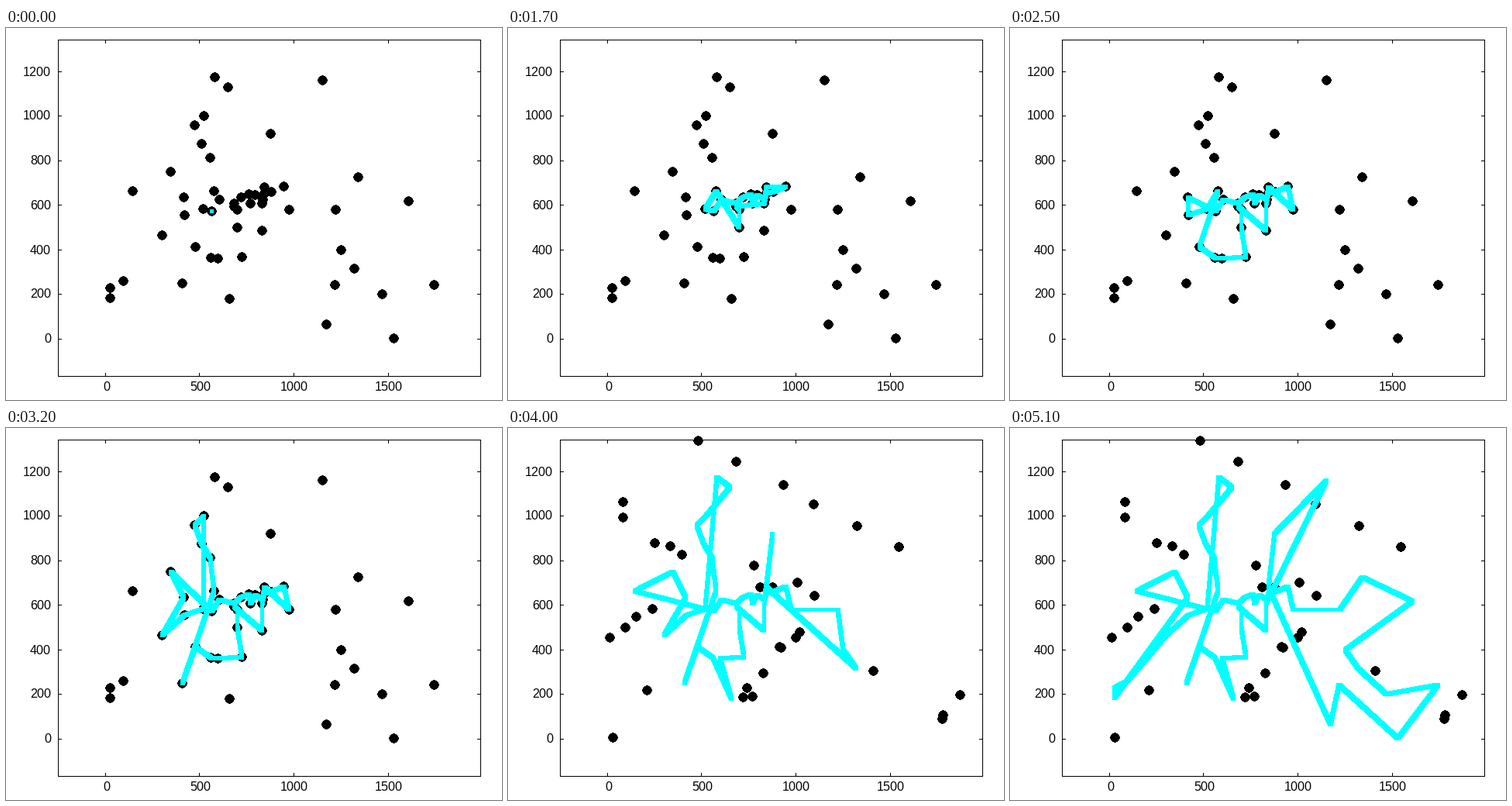
These frames come from a looping animation (640x480 px, 5.2 s). A matplotlib script:

```python
import numpy as np
import matplotlib.pyplot as plt
from matplotlib.animation import FuncAnimation
from matplotlib.collections import PolyCollection
from matplotlib.patches import Rectangle

W, H, DPI = 640, 480, 100
LEFT, RIGHT, TOP, BOTTOM = 67, 612, 15, 449
PEN, RADIUS, DIGIT = 5, 5.6, 9
SWAP_STEP = 39  # the dots switch to the second set here

# Corner points of the route, by region; the tour starts in the centre
CENTRE = [(565, 575), (520, 585), (575, 665), (605, 625), (685, 610),
          (685, 595), (700, 580), (720, 635), (760, 650), (795, 645),
          (770, 610), (830, 610), (835, 625), (845, 655), (845, 680),
          (880, 660), (945, 685), (975, 580)]
WEST = [(420, 555), (415, 635), (345, 750), (145, 665), (300, 465),
        (95, 260), (25, 230), (25, 185)]
NORTH = [(555, 815), (510, 875), (475, 960), (525, 1000), (650, 1130),
         (580, 1175), (875, 920), (1150, 1160)]
SOUTH = [(480, 415), (410, 250), (560, 365), (595, 360), (660, 180),
         (725, 370), (700, 500), (830, 485)]
EAST = [(1220, 580), (1250, 400), (1215, 245), (1170, 65), (1320, 315),
        (1465, 200), (1530, 5), (1740, 245), (1605, 620), (1340, 725)]
CITIES = np.array(CENTRE + WEST + NORTH + SOUTH + EAST)


def px(x):
    return np.rint(127.5 + 0.2437 * x).astype(int)


def py(y):
    return np.rint(401 - 0.28766 * y).astype(int)


PIXELS = np.column_stack([px(CITIES[:, 0]), py(CITIES[:, 1])])
rng = np.random.default_rng(4)


def strand(start, end, count, spread=4):
    """Loose row of dots between two pixels, shaken except at its ends."""
    row = np.linspace(start, end, count)
    row[1:-1] += rng.normal(0, spread, (count - 2, 2))
    return np.rint(row)


def scattered_dots():
    return np.vstack([
        strand((245, 16), (504, 153), 6),
        strand((148, 95), (224, 163), 5, 12),
        strand((317, 177), (395, 216), 5, 8),
        strand((186, 233), (131, 270), 4),
        strand((371, 270), (303, 347), 8, 10),
        strand((179, 338), (135, 399), 2),
        strand((471, 313), (560, 375), 2),
        strand((583, 344), (561, 370), 2),
    ])


def insertion_tours():
    """Add the city closest to the tour, right after its nearest member."""
    dist = np.hypot(*(CITIES[:, None] - CITIES[None]).transpose(2, 0, 1))
    tour, tours = [0], [[0]]
    rest = list(range(1, len(CITIES)))
    while rest:
        gap = dist[np.ix_(rest, tour)]
        i, j = np.unravel_index(gap.argmin(), gap.shape)
        tour.insert(j + 1, rest.pop(i))
        tours.append(tour[:])
    return tours


def disc(center):
    a = np.linspace(0, 2 * np.pi, 48, endpoint=False)
    return center + RADIUS * np.column_stack([np.cos(a), np.sin(a)])


def stroke(p, q):
    """Outline of a square pen dragged from p to q."""
    sx, sy = np.where(q >= p, 1, -1) * PEN / 2
    near, side, far, other = np.array([(-sx, -sy), (sx, -sy),
                                       (sx, sy), (-sx, sy)])
    return np.array([p + near, p + side, q + side,
                     q + far, q + other, p + other])


def tour_shapes(tour):
    pts = PIXELS[tour]
    return [stroke(p, q) for p, q in zip(pts, np.roll(pts, -1, axis=0))]


plt.rcParams.update({"font.family": "Liberation Sans",
                     "text.hinting": "default", "text.hinting_factor": 1})
fig = plt.figure(figsize=(W / DPI, H / DPI), dpi=DPI, facecolor="white")
ax = fig.add_axes([0, 0, 1, 1])
ax.set_xlim(-0.5, W - 0.5)
ax.set_ylim(H - 0.5, -0.5)
ax.axis("off")


def bar(x0, y0, x1, y1):
    """Black bar covering the given pixels, ends included."""
    ax.add_patch(Rectangle((x0 - 0.5, y0 - 0.5), x1 - x0 + 1, y1 - y0 + 1,
                           fc="black", lw=0, aa=False, zorder=1))


def label(x, y, text):
    ax.text(x - 0.5, y, text, ha="left", va="baseline",
            fontsize=16 * 72 / DPI, color="black")


def draw_frame():
    for y in (TOP, BOTTOM):
        bar(LEFT, y, RIGHT, y)
    for x in (LEFT, RIGHT):
        bar(x, TOP, x, BOTTOM)
    for value in range(0, 1501, 500):
        x, text = int(px(value)), str(value)
        bar(x, TOP, x, TOP + 4)
        bar(x, BOTTOM - 4, x, BOTTOM)
        label(x + 1 - DIGIT * len(text) // 2, 468, text)
    for value in range(0, 1201, 200):
        y, text = int(py(value)), str(value)
        bar(LEFT, y, LEFT + 4, y)
        bar(RIGHT - 4, y, RIGHT, y)
        label(58 - DIGIT * len(text), y + 5, text)


def layer(color, z):
    shapes = PolyCollection([], facecolors=color, edgecolors="none",
                            linewidths=0, antialiaseds=False, zorder=z)
    shapes.set_snap(False)
    return ax.add_collection(shapes, autolim=False)


draw_frame()
dots = layer("black", 2)
path = layer("#00ffff", 3)

tours = insertion_tours()
city_discs = [disc(p) for p in PIXELS]
other_discs = [disc(p) for p in scattered_dots()]


def update(step):
    dots.set_verts(city_discs if step < SWAP_STEP else other_discs)
    path.set_verts(tour_shapes(tours[step]))
    return dots, path


anim = FuncAnimation(fig, update, frames=len(tours), interval=100,
                     repeat=True, repeat_delay=0, blit=False)
plt.show()
```
